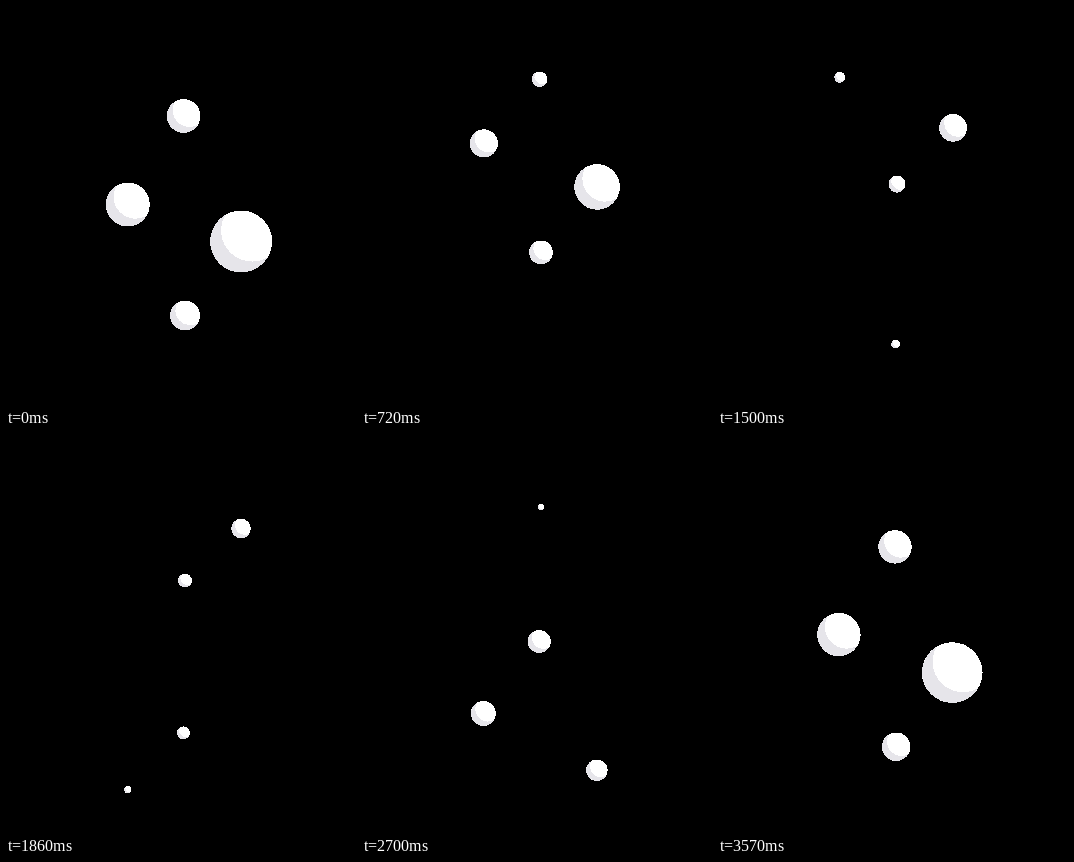
Animation of 350 by 400 pixels, one loop 3.6 s. Source, as an HTML page:

```html
<!DOCTYPE html>
<html lang="en">
<head>
<meta charset="utf-8">
<title>Rising bubbles</title>
<style>
  @property --x { syntax: '<number>'; inherits: false; initial-value: 0; }
  @property --y { syntax: '<number>'; inherits: false; initial-value: 0; }
  @property --r { syntax: '<number>'; inherits: false; initial-value: 1; }

  html, body { margin: 0; width: 100%; height: 100%; overflow: hidden; background: #000; }
  svg { display: block; width: 350px; height: 400px; shape-rendering: crispEdges; }

  .bubble {
    transform: translate(calc(var(--x) * 1px), calc(var(--y) * 1px)) scale(var(--r));
    animation: 3600ms infinite;
  }
  .top    { animation-name: top; }
  .left   { animation-name: left; }
  .right  { animation-name: right; }
  .bottom { animation-name: bottom; }

  /* Each bubble shrinks away at the top, then reappears below and grows; 30 ms steps. */
  @keyframes top {
    0%       { --x: 177.6; --y: 110;   --r: 16.9; animation-timing-function: steps(40); }
    33.3332% { --x: 177.6; --y: 48.7;  --r: 1.6; }
    33.3333% { --x: 177.6; --y: 370.7; --r: 2.5;  animation-timing-function: steps(80); }
    100%     { --x: 177;   --y: 109.6; --r: 16.9; }
  }
  @keyframes left {
    0%       { --x: 121.8; --y: 198.5; --r: 22;   animation-timing-function: steps(60); }
    49.9999% { --x: 121.8; --y: 45.8;  --r: 2.2; }
    50%      { --x: 121.8; --y: 361;   --r: 3;    animation-timing-function: steps(60); }
    100%     { --x: 120.9; --y: 197.9; --r: 22; }
  }
  @keyframes right {
    0%       { --x: 235.1; --y: 235.5; --r: 31;   animation-timing-function: steps(80); }
    66.6665% { --x: 235.1; --y: 53.6;  --r: 3.6; }
    66.6666% { --x: 235.1; --y: 369.9; --r: 4;    animation-timing-function: steps(40); }
    100%     { --x: 234.2; --y: 235.2; --r: 31; }
  }
  @keyframes bottom {
    0%       { --x: 179;   --y: 309.5; --r: 15;   animation-timing-function: steps(100); }
    83.3332% { --x: 179;   --y: 46.7;  --r: 2; }
    83.3333% { --x: 179;   --y: 372.5; --r: 2.4;  animation-timing-function: steps(20); }
    100%     { --x: 178.1; --y: 309.6; --r: 14.9; }
  }
</style>
</head>
<body>
<svg viewBox="0 0 350 400">
  <defs>
    <g id="ball">
      <circle r="1" fill="#fff"/>
      <path d="M-.507-.862A1 1 0 1 0 .862 .507A1 1 0 0 1-.507-.862Z" fill="#e6e5ea"/>
    </g>
  </defs>
  <use href="#ball" class="bubble top"/>
  <use href="#ball" class="bubble left"/>
  <use href="#ball" class="bubble right"/>
  <use href="#ball" class="bubble bottom"/>
</svg>
</body>
</html>
```
